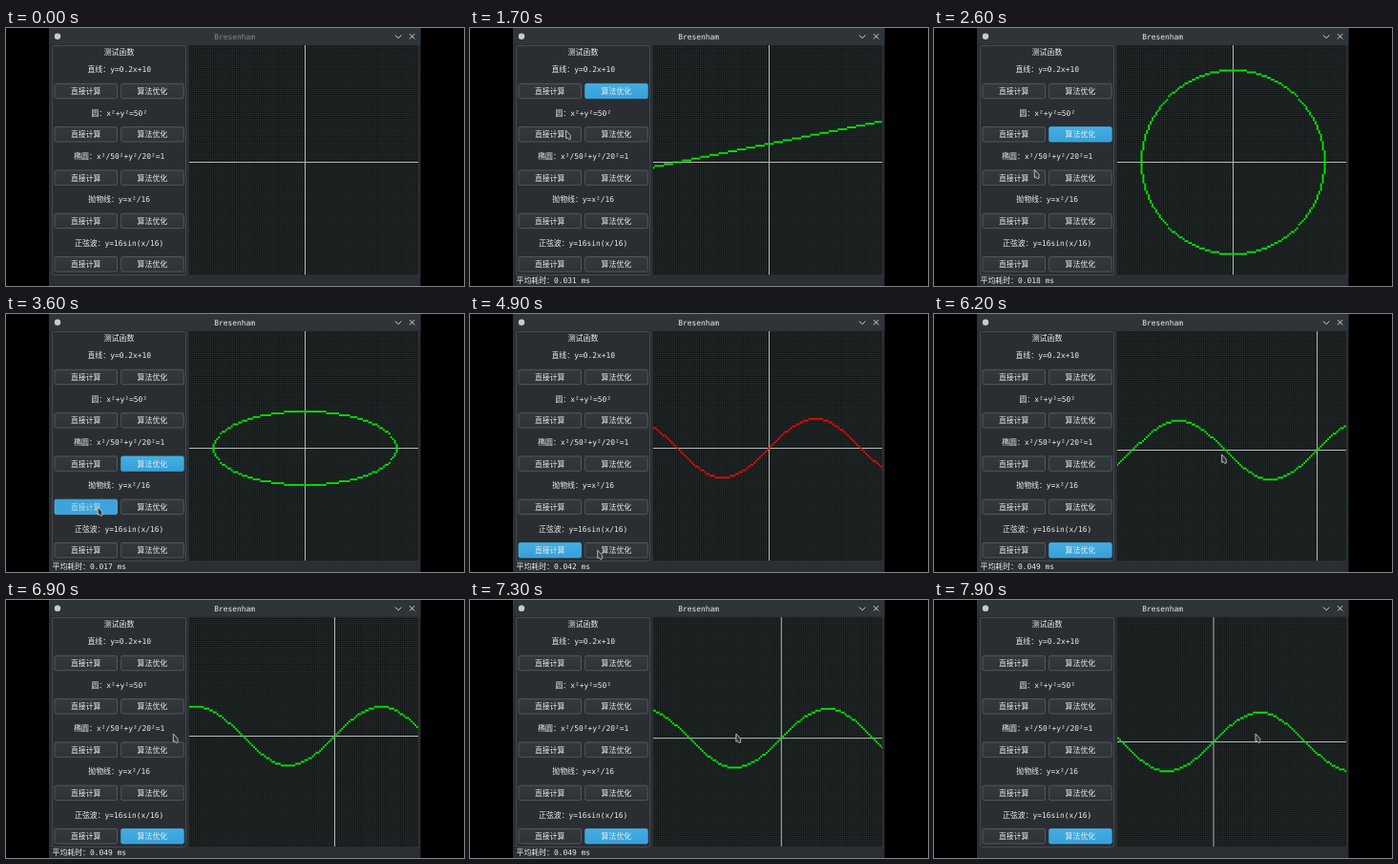
These frames come from a looping animation (480x270 px, 8 s). An HTML page with a canvas:

```html
<!DOCTYPE html>
<html lang="zh">
<head>
<meta charset="utf-8">
<title>Bresenham</title>
<style>
  html, body { margin: 0; width: 100%; height: 100%; overflow: hidden; background: #000; }
  canvas { position: absolute; left: 192px; top: 18px; }
  svg { position: absolute; left: 0; top: 0; }
  text { font: 7.9px "DejaVu Sans Mono", "Noto Sans CJK SC", "Noto Sans CJK", monospace; fill: #eceded; white-space: pre; }
  .mid { text-anchor: middle; }
  .button rect { fill: url(#plain); stroke: #5c6165; stroke-width: .8; }
  .button.focus rect { fill: url(#blue); stroke: #45aee2; }
  .button.down rect { fill: #3ca4dc; stroke: #58b6e4; }
  .button.down text { fill: #c6dce6; }
  .line { fill: none; stroke: #d5d7d9; stroke-width: 1; }
</style>
</head>
<body>
<svg id="ui" width="480" height="270" viewBox="0 0 480 270">
  <defs>
    <linearGradient id="plain" x2="0" y2="1"><stop stop-color="#34393d"/><stop offset="1" stop-color="#2e3337"/></linearGradient>
    <linearGradient id="blue" x2="0" y2="1"><stop stop-color="#44aee2"/><stop offset="1" stop-color="#379fd8"/></linearGradient>
  </defs>
  <rect x="45" width="389.5" height="270" fill="#2b2f33"/>
  <rect x="45" width="389.5" height="17" fill="#2f3438"/>
  <circle cx="54" cy="8.7" r="3.2" fill="#c9cbcc"/>
  <text id="title" class="mid" x="239.7" y="11.6">Bresenham</text>
  <path class="line" d="M408 7.5l3.2 3.2 3.2-3.2M423 6.2l5.2 5.2m0-5.2l-5.2 5.2"/>
  <rect x="48.5" y="18.5" width="140" height="240" rx="1.5" fill="#2a2e32" stroke="#4c5155" stroke-width=".8"/>
  <text class="mid" x="118.5" y="28">测试函数</text>
  <text id="status" x="48.5" y="267.3"></text>
</svg>
<canvas id="plot" width="240" height="240"></canvas>
<svg width="480" height="270" viewBox="0 0 480 270">
  <path id="mouse" d="M0 0V8.3L1.7 7.7 3.2 9.6 5 8.6 4.4 6.8 5 5.4Z" fill="#34383b" stroke="#d8dadb" stroke-width=".8"/>
</svg>
<script>
const LOOP = 8000, PRESS = 260, SIZE = 240, CELL = SIZE / 125, ROW = 45.3;
const $ = id => document.getElementById(id);
const ctx = $('plot').getContext('2d');

const arch = b => x => b * Math.sqrt(Math.max(0, 1 - x * x / 2500));
const shapes = [
  { label: '直线：y=0.2x+10', cost: [0.033, 0.031], f: x => 0.2 * x + 10, reach: 130 },
  { label: '圆：x²+y²=50²', cost: [0.025, 0.018], f: arch(50), reach: 50, mirror: true },
  { label: '椭圆：x²/50²+y²/20²=1', cost: [0.023, 0.017], f: arch(20), reach: 50, mirror: true },
  { label: '抛物线：y=x²/16', cost: [0.024, 0.021], f: x => x * x / 16, reach: 36 },
  { label: '正弦波：y=16sin(x/16)', cost: [0.042, 0.049], f: x => 16 * Math.sin(x / 16), reach: 130 }
];

function add(parent, tag, attrs, text = '') {
  const el = document.createElementNS('http://www.w3.org/2000/svg', tag);
  for (const k in attrs) el.setAttribute(k, attrs[k]);
  el.textContent = text;
  return parent.appendChild(el);
}

// Direct: one cell per column. Optimised: steep columns become connected runs.
function cells({ f, reach, mirror }, optimised) {
  const list = [];
  for (let x = -reach; x <= reach; x++) {
    const a = f(x - 0.5), b = f(x + 0.5);
    let lo = Math.round(f(x)), hi = lo;
    if (optimised && Math.abs(a - b) > 1) {
      lo = Math.round(Math.min(a, b));
      hi = Math.max(lo, Math.round(Math.max(a, b)) - 1);
    }
    for (let y = lo; y <= hi; y++) {
      list.push([x, y]);
      if (mirror) list.push([x, -y]);
    }
  }
  return list;
}

// Each button is clicked in turn; its curve appears at time `done`.
const runs = [], mousePath = [[300, 150, 120]];
shapes.forEach((shape, i) => {
  const y = ROW * i;
  add($('ui'), 'text', { class: 'mid', x: 118.7, y: y + 46.3 }, shape.label);
  ['直接计算', '算法优化'].forEach((name, j) => {
    const button = add($('ui'), 'g', { class: 'button' }), x = 51 + 69.7 * j;
    add(button, 'rect', { x, y: y + 58.3, width: 65.5, height: 15.4, rx: 1.5 });
    add(button, 'text', { class: 'mid', x: x + 32.7, y: y + 69 }, name);
    const done = 1065 + 925 * i + 480 * j;
    runs.push({ button, done, cost: shape.cost[j].toFixed(3), cells: cells(shape, j) });
    mousePath.push([done - 230, 96 + 50 * j, y + 66], [done + 20, 96 + 50 * j, y + 66]);
  });
});
mousePath.push([5700, 214, 145], [6200, 302, 147], [6900, 175, 140], [7900, 337, 140]);
const originPath = [[5750, 313.5, 140.5], [6200, 401.5, 142.5], [6900, 344.5, 142.5], [7900, 293, 148.5]];

const easeOut = k => k * (2 - k), smooth = k => k * k * (3 - 2 * k);

function along(path, t, ease) {
  const i = path.findIndex(p => p[0] > t);
  const b = path.at(i), a = i > 0 ? path[i - 1] : b;
  const k = a === b ? 0 : ease((t - a[0]) / (b[0] - a[0]));
  return [1, 2].map(n => a[n] + (b[n] - a[n]) * k);
}

function drawPlot(run, ox, oy) {
  ctx.fillStyle = '#0c1010';
  ctx.fillRect(0, 0, SIZE, SIZE);
  ctx.fillStyle = '#262c2c';
  const first = o => (o + CELL / 2) % CELL - CELL;
  for (let x = first(ox); x < SIZE; x += CELL) ctx.fillRect(x - 0.35, 0, 0.7, SIZE);
  for (let y = first(oy); y < SIZE; y += CELL) ctx.fillRect(0, y - 0.35, SIZE, 0.7);
  ctx.fillStyle = '#b0b4b4';
  ctx.fillRect(ox - 0.5, 0, 1, SIZE);
  ctx.fillRect(0, oy - 0.5, SIZE, 1);
  if (!run) return;
  ctx.fillStyle = runs.indexOf(run) % 2 ? '#00f000' : '#f00808';
  for (const [x, y] of run.cells)
    ctx.fillRect(ox + (x - 0.5) * CELL, oy - (y + 0.5) * CELL, CELL, CELL);
}

function frame(now) {
  const t = now % LOOP;
  const current = runs.filter(r => r.done <= t).pop();
  for (const r of runs) {
    const down = t >= r.done - PRESS && t < r.done;
    r.button.setAttribute('class', 'button' + (down ? ' down' : r === current ? ' focus' : ''));
  }
  $('title').style.fill = t < runs[0].done - PRESS ? '#85898c' : '#eceded';
  $('status').textContent = current && t < 7550 ? `平均耗时：${current.cost} ms` : '';
  const [ox, oy] = along(originPath, t, smooth);
  drawPlot(current, ox - 192, oy - 18);
  $('mouse').setAttribute('transform', `translate(${along(mousePath, t, easeOut)})`);
  $('mouse').style.display = t < 300 ? 'none' : '';
  requestAnimationFrame(frame);
}
requestAnimationFrame(frame);
</script>
</body>
</html>
```
